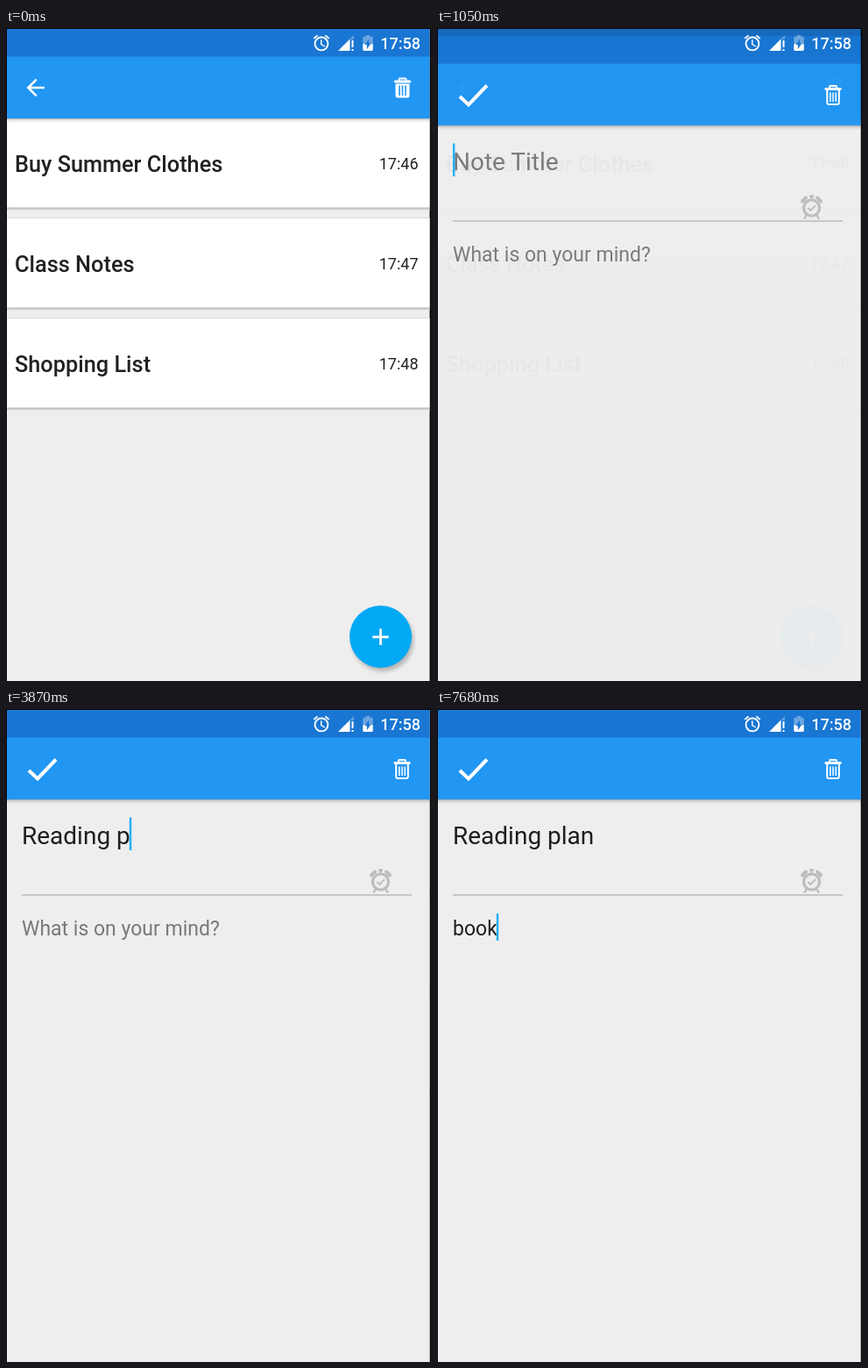
Write an HTML page that moves like this. It is 485x744 px and loops after 8000 ms.

```html
<!DOCTYPE html>
<html lang="en">
<head>
<meta charset="utf-8">
<title>Notes</title>
<style>
  html, body { margin: 0; width: 100%; height: 100%; overflow: hidden; background: #000; }
  svg { display: block; width: 485px; height: 744px; }
  text { font-family: Roboto, "Liberation Sans", sans-serif; white-space: pre; fill: #212121; }
  .name { font-size: 25.3px; font-weight: 500; }
  .time { font-size: 18px; text-anchor: end; }
  .title { font-size: 28px; }
  .body { font-size: 23px; }
  .line { fill: none; stroke: #fff; }
</style>
</head>
<body>
<svg viewBox="0 0 485 744">
  <defs>
    <clipPath id="screen"><rect x="1" y="1" width="482.5" height="743"/></clipPath>
    <linearGradient id="shade" x2="0" y2="1">
      <stop offset="0" stop-color="#000" stop-opacity=".3"/>
      <stop offset=".4" stop-color="#000" stop-opacity=".1"/>
      <stop offset="1" stop-color="#000" stop-opacity="0"/>
    </linearGradient>
    <filter id="soft" x="-30%" y="-30%" width="160%" height="160%"><feGaussianBlur stdDeviation="2.5"/></filter>
    <g id="bars">
      <rect x="1" y="1" width="483" height="32" fill="#1976d2"/>
      <rect x="1" y="32.6" width="483" height="70.4" fill="#2196f3"/>
      <rect x="1" y="103" width="483" height="5" fill="url(#shade)"/>
    </g>
    <g id="lid" fill="#fff">
      <rect x="443" y="59.5" width="19" height="3" rx="1"/>
      <path class="line" d="M448.5 60V58.2q0-.7.7-.7h6.6q.7 0 .7.7V60" stroke-width="1.8"/>
    </g>
  </defs>

  <g clip-path="url(#screen)">
    <g id="list">
      <rect x="1" y="1" width="483" height="743" fill="#eee"/>
      <g id="cards"></g>
      <use href="#bars"/>
      <path fill="#fff" transform="translate(18.4 52.6) scale(1.28)"
        d="M20 11H7.83l5.59-5.59L12 4l-8 8 8 8 1.41-1.41L7.83 13H20z"/>
      <use href="#lid"/>
      <path fill="#fff" d="M444.5 63.5h16v14q0 2-2 2h-12q-2 0-2-2z"/>
      <path d="M449 65.5v11.5M452.5 65.5v11.5M456 65.5v11.5" stroke="#2196f3" stroke-width="1.6"/>
      <circle cx="430" cy="698" r="35" opacity=".25" filter="url(#soft)"/>
      <circle cx="427.5" cy="693.5" r="35.5" fill="#03a9f4"/>
      <ellipse id="ripple" cx="425" cy="695" rx="18" ry="33" fill="#fff" opacity=".08"/>
      <path class="line" d="M418.3 693.8h18.4M427.5 684.6v18.4" stroke-width="2.7"/>
    </g>

    <g id="editor">
      <rect x="1" y="1" width="483" height="743" fill="#eee"/>
      <use href="#bars"/>
      <path class="line" d="M26 70l10 9.5L57 57.5" stroke-width="4"/>
      <g transform="translate(-.5 .5)">
        <use href="#lid"/>
        <path class="line" d="M445.7 62v14.5q0 2 2 2h9.6q2 0 2-2V62" stroke-width="2"/>
        <path class="line" d="M449.3 65v10.5M452.5 65v10.5M455.7 65v10.5" stroke-width="1.5"/>
      </g>
      <rect x="18" y="211" width="445" height="1.8" fill="#c3c3c3"/>
      <g fill="none" stroke="#bdbdbd">
        <circle cx="427.5" cy="197" r="9" stroke-width="3.2"/>
        <path d="M417 189.5l4-4M438 189.5l-4-4" stroke-width="4" stroke-linecap="round"/>
        <path d="M422 204.5l-2.8 5M433 204.5l2.8 5M427.5 182.5v5M425 183.5h5" stroke-width="2.4"/>
        <path d="M423.3 197l3 3 5.6-5.8" stroke-width="1.9"/>
      </g>
      <text id="title" class="title" x="18" y="153.5"></text>
      <text id="body" class="body" x="18" y="258"></text>
      <rect id="caret" width="2.5" fill="#29b0f2"/>
    </g>
    <rect id="black" x="1" y="1" width="483" height="743"/>
  </g>

  <g fill="#fff">
    <path transform="translate(348.8 5.9) scale(.93)" fill-rule="evenodd"
      d="M22 5.72l-4.6-3.86-1.29 1.53 4.6 3.86zM7.88 3.39L6.6 1.86 2 5.71l1.29 1.53zM12.5 8H11v6l4.75 2.85.75-1.23-4-2.37zM12 4a9 9 0 1 0 0 18a9 9 0 1 0 0-18zM12 6a7 7 0 1 1 0 14a7 7 0 1 1 0-14z"/>
    <path d="M379 26l13.5-13.5V26z"/>
    <path d="M392.5 12.5L397 8v5h-4.5z" opacity=".3"/>
    <path d="M394.5 14h2v8h-2zM394.5 24h2v2h-2z"/>
    <g transform="translate(399.2 6.2) scale(1.15 .9)">
      <path d="M17 5.33C17 4.6 16.4 4 15.67 4H14V2h-4v2H8.33C7.6 4 7 4.6 7 5.33v8.17h2.53L13 7v5.5h2l-.53 1H17z" opacity=".35"/>
      <path d="M14.47 13.5L11 20v-5.5H9l.53-1H7v7.17C7 21.4 7.6 22 8.33 22h7.33c.74 0 1.34-.6 1.34-1.33V13.5z"/>
    </g>
    <text x="473" y="24" class="time" style="font-weight:500;fill:#fff">17:58</text>
  </g>
</svg>
<script>
const LOOP = 8000, LEFT = 18;
const $ = id => document.getElementById(id);

const notes = [["Buy Summer Clothes", "17:46"], ["Class Notes", "17:47"], ["Shopping List", "17:48"]];
$("cards").innerHTML = notes.map(([name, time], i) => {
  const strip = (y, h, fill) => `<rect x="1" y="${y}" width="483" height="${h}" fill="${fill}"/>`;
  return `<g transform="translate(0 ${i * 114})">` +
    strip(102, 1, "#dedede") + `<rect class="card" x="1" y="103" width="483" height="101.5"/>` +
    strip(204.5, 1.5, "#c2c2c2") + strip(206, 1, "#d2d2d2") + strip(207, 1, "#e6e6e6") +
    `<text class="name" x="10" y="164">${name}</text>` +
    `<text class="time" x="470.5" y="161">${time}</text></g>`;
}).join("");
const cards = document.querySelectorAll(".card");

// [time, typed text] and [time, caret: t = title, b = body, empty = hidden]
const titleKeys = [[0, ""], [1920, "R"], [2310, "Re"], [2430, "Rea"], [2520, "Read"],
  [3060, "Readi"], [3270, "Readin"], [3390, "Reading"], [3480, "Reading "],
  [3870, "Reading p"], [4560, "Reading pl"], [4680, "Reading pla"], [4830, "Reading plan"]];
const bodyKeys = [[0, ""], [7140, "b"], [7350, "bo"], [7500, "boo"], [7680, "book"]];
const caretKeys = [[0, "t"], [1320, ""], [1770, "t"], [2970, ""], [3060, "t"], [4320, ""],
  [4560, "t"], [5280, ""], [5730, "t"], [6180, ""], [6420, "b"], [6870, ""], [7140, "b"]];
const blackKeys = [[0, 0], [330, 0.5], [390, 1], [450, 0]];

const at = (keys, t) => keys.reduce((value, key) => t >= key[0] ? key[1] : value, keys[0][1]);

const pen = document.createElement("canvas").getContext("2d");
function widthOf(text, size) {
  pen.font = `${size}px Roboto, "Liberation Sans", sans-serif`;
  return pen.measureText(text).width;
}

function setField(id, text, hint) {
  $(id).textContent = text || hint;
  $(id).style.fill = text ? "#1e1e1e" : "#797979";
}

function placeCaret(text, size, y, height) {
  const caret = $("caret");
  caret.setAttribute("x", Math.max(LEFT, LEFT + widthOf(text, size) - 1));
  caret.setAttribute("y", y);
  caret.setAttribute("height", height);
}

// The editor rises and fades in while the list dims behind it.
function openEditor(t) {
  const editor = $("editor");
  const tick = Math.floor((t - 960) / 30) * 30 + 25;
  const part = span => Math.min(1, Math.max(0, tick / span));
  const shown = t >= 960;
  editor.style.display = shown ? "" : "none";
  const rise = Math.round(60 * (1 - part(350)) ** 5);
  editor.setAttribute("transform", `translate(0 ${rise})`);
  editor.setAttribute("opacity", 1 - (1 - part(200)) ** 4);
  $("list").setAttribute("opacity", shown ? 1 - 0.2 * part(217) : 1);
}

function draw(t) {
  const cardFill = t >= 450 && t < 540 ? "#fafafa" : "#fff";
  cards.forEach(card => card.setAttribute("fill", cardFill));
  $("black").setAttribute("opacity", at(blackKeys, t));
  $("ripple").style.display = t >= 780 ? "" : "none";
  openEditor(t);

  const title = at(titleKeys, t), body = at(bodyKeys, t), caret = at(caretKeys, t);
  setField("title", title, "Note Title");
  setField("body", body, "What is on your mind?");
  $("caret").style.display = caret ? "" : "none";
  if (caret === "t") placeCaret(title, 28, 123.5, 37.5);
  if (caret === "b") placeCaret(body, 23, 233, 31);
}

const start = performance.now();
function frame() {
  draw((performance.now() - start) % LOOP);
  requestAnimationFrame(frame);
}
frame();
</script>
</body>
</html>
```
